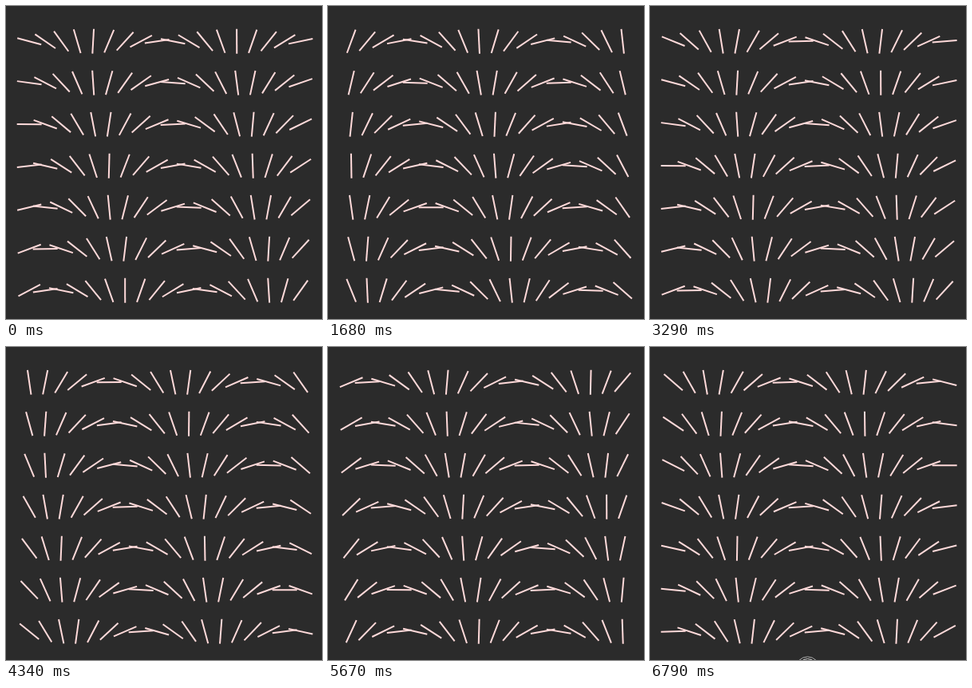
These frames come from a looping animation (396 by 392 pixels, 6.86 s). An HTML page:

```html
<!DOCTYPE html>
<html lang="en">
<head>
<meta charset="utf-8">
<title>Turning lines</title>
<style>
  html, body { margin: 0; width: 100%; height: 100%; overflow: hidden; background: #2b2b2b; }
  svg { display: block; width: 396px; height: 392px; }
  line { stroke: #ffdada; stroke-width: 2; }
</style>
</head>
<body>
<svg viewBox="0 0 396 392">
  <g id="lines"></g>
  <g id="ring" fill="none" visibility="hidden">
    <circle cx="197.5" cy="403" r="15" fill="#1c1c1c" stroke="#b8b8b8"/>
    <circle cx="197.5" cy="403" r="12.5" stroke="#e4e4e4"/>
  </g>
</svg>
<script>
const COLS = 18, ROWS = 7;
const GAP_X = 20, GAP_Y = 52, HALF = 15.5;
const LEFT = 29.2, TOP = 44.2;
const STEP_MS = 70, STEPS = 98;
// Angles in degrees
const START = 14.8, PER_STEP = 3.981, PER_LINE = 19.606;

const group = document.getElementById('lines');
const ring = document.getElementById('ring');

const lines = Array.from({ length: COLS * ROWS }, (_, i) => {
  const el = document.createElementNS('http://www.w3.org/2000/svg', 'line');
  const x = LEFT + (i % COLS) * GAP_X;
  const y = TOP + Math.floor(i / COLS) * GAP_Y;
  group.appendChild(el);
  return { el, x, y, phase: START + i * PER_LINE };
});

function draw(step) {
  for (const { el, x, y, phase } of lines) {
    const a = (phase + step * PER_STEP) * Math.PI / 180;
    const dx = HALF * Math.cos(a), dy = HALF * Math.sin(a);
    el.setAttribute('x1', x - dx);
    el.setAttribute('y1', y - dy);
    el.setAttribute('x2', x + dx);
    el.setAttribute('y2', y + dy);
  }
  ring.setAttribute('visibility', step === STEPS - 1 ? 'visible' : 'hidden');
}

const began = performance.now();
let shown = -1;
function tick() {
  const step = Math.floor((performance.now() - began) / STEP_MS) % STEPS;
  if (step !== shown) draw(shown = step);
  requestAnimationFrame(tick);
}
tick();
</script>
</body>
</html>
```
